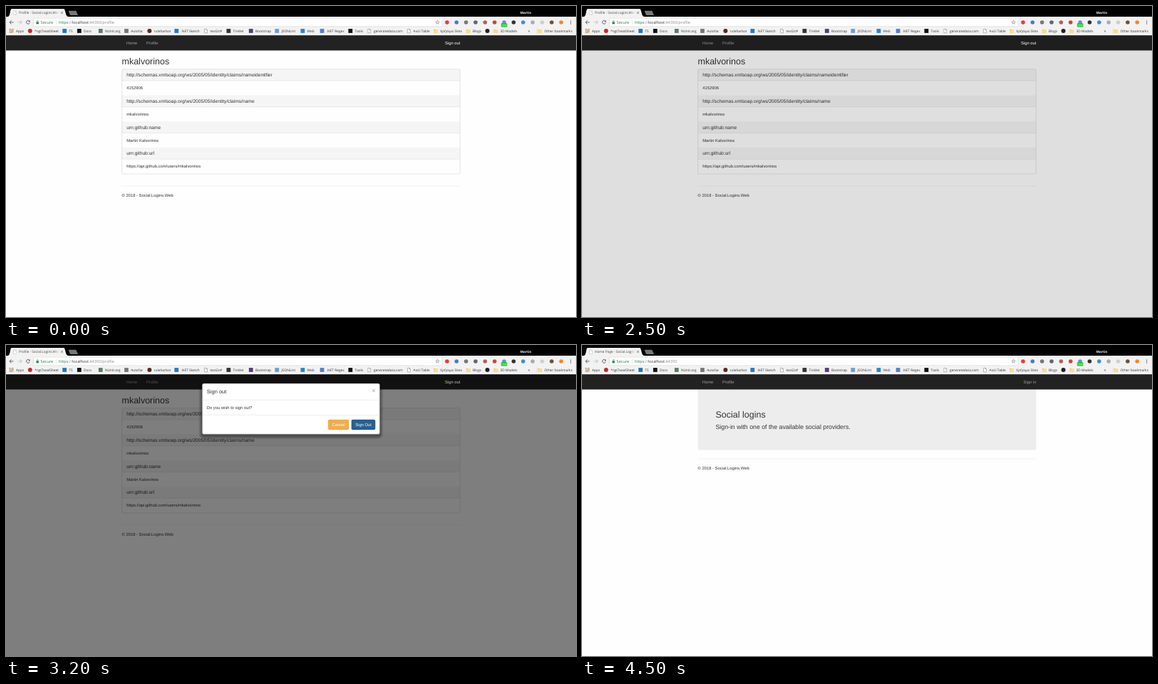
Animation, 800 px wide and 437 px high, one loop 6100 ms. Source, as an HTML page:

```html
<!DOCTYPE html>
<html lang="en">
<head>
<meta charset="utf-8">
<title>Sign out dialog</title>
<style>
  html, body { margin: 0; width: 100%; height: 100%; overflow: hidden; background: #000; }
  svg { display: block; width: 100vw; height: 100vh; }
  text { white-space: pre; text-rendering: geometricPrecision; }
  .page { font-family: "Liberation Sans", Arial, sans-serif; }
  .ui { font-family: "Open Sans", "Noto Sans", sans-serif; }
</style>
</head>
<body>
<svg id="stage" viewBox="0 0 800 437" preserveAspectRatio="none"></svg>
<script>
const NS = "http://www.w3.org/2000/svg";
const LOOP = 6100, STEP = 100;
const T = { backdrop: 2500, modal: 2700, hover: 3200, load: 3500, home: 4200, done: 4400 };
const USER = "mkalvorinos";

function el(parent, tag, attrs = {}) {
  const node = document.createElementNS(NS, tag);
  for (const key in attrs) node.setAttribute(key, attrs[key]);
  parent.appendChild(node);
  return node;
}
const group = (parent, attrs) => el(parent, "g", attrs);
const rect = (parent, x, y, width, height, fill, more) =>
  el(parent, "rect", { x, y, width, height, fill, ...more });
const dot = (parent, cx, cy, r, fill) => el(parent, "circle", { cx, cy, r, fill });
const path = (parent, d, more) => el(parent, "path", { d, fill: "none", ...more });
function text(parent, x, y, size, fill, str, more) {
  const node = el(parent, "text", { x, y, "font-size": size, fill, ...more });
  node.textContent = str;
  return node;
}
const line = (parent, x1, x2, y, stroke) =>
  path(parent, `M${x1} ${y}H${x2}`, { stroke, "stroke-width": 0.6 });
const show = (node, on) => node.setAttribute("display", on ? "inline" : "none");

const svg = document.getElementById("stage");
const page = group(svg, { class: "page" });
const ui = group(svg, { class: "ui" });

// ---- Web page ----
rect(page, 0, 41, 800, 396, "#fefefe");

function footer(parent, y) {
  line(parent, 162.5, 637.5, y, "#e8e8e8");
  text(parent, 162.5, y + 14.9, 5.83, "#333", "© 2018 - Social.Logins.Web");
}

function buildProfile() {
  const g = group(page);
  text(g, 162.5, 81.7, 12.5, "#333", USER);
  const claims = "http://schemas.xmlsoap.org/ws/2005/05/identity/claims/";
  const rows = [
    [claims + "nameidentifier", "4152906"],
    [claims + "name", USER],
    ["urn:github:name", "Martin Kalvorinos"],
    ["urn:github:url", "https://api.github.com/users/" + USER]
  ];
  rows.forEach(([head, body], i) => {
    const y = 88.8 + i * 36.7;
    rect(g, 162.8, y, 474.4, 16.2, "#f5f5f5", { rx: i ? 0 : 1.5 });
    line(g, 162.8, 637.2, y + 16.2, "#ddd");
    text(g, 169.2, y + 10.4, 6.67, "#333", head);
    text(g, 169.2, y + 28.5, 5.83, "#333", body);
  });
  rect(g, 162.7, 88.6, 474.6, 147.4, "none", { rx: 1.7, stroke: "#d4d4d4", "stroke-width": 0.6 });
  footer(g, 252.9);
  return g;
}

function buildHome() {
  const g = group(page);
  rect(g, 162.5, 62.3, 475, 85.2, "#eeedee", { rx: 2.5 });
  text(g, 187.5, 101.8, 12.5, "#333", "Social logins");
  text(g, 187.5, 117.7, 8.75, "#333", "Sign-in with one of the available social providers.");
  footer(g, 159.8);
  return g;
}

const profile = buildProfile();
const home = buildHome();

rect(page, 0, 41, 800, 21.5, "#222");
text(page, 168.8, 53.8, 5.83, "#9d9d9d", "Home");
text(page, 196.9, 53.8, 5.83, "#9d9d9d", "Profile");
const backdrop = rect(page, 0, 41, 800, 396, "#000");
const signLink = text(page, 637.4, 53.8, 5.83, "#fff", "", { "text-anchor": "end" });

function buildModal() {
  const g = group(page);
  // soft drop shadow from stacked translucent outlines
  for (let i = 6; i > 0; i--) {
    rect(g, 275.5 - i * 0.8, 56 - i * 0.8, 249 + i * 1.6, 71.5 + i * 1.6, "#000",
      { rx: 2.5 + i * 0.8, opacity: 0.075 });
  }
  rect(g, 275.3, 54, 249.4, 71.4, "#fff", { rx: 2.5, stroke: "#555", "stroke-width": 0.5 });
  text(g, 281.8, 68.1, 7.5, "#333", "Sign out");
  text(g, 516, 67, 8.75, "#bbb", "×", { "text-anchor": "middle", "font-weight": "bold" });
  line(g, 275.6, 524.4, 77.3, "#e2e2e2");
  text(g, 281.8, 90.1, 5.83, "#333", "Do you wish to sign out?");
  line(g, 275.6, 524.4, 98.4, "#e2e2e2");
  return g;
}

function button(parent, x, width, fill, stroke, label) {
  const box = rect(parent, x, 105.1, width, 13.8, fill, { rx: 1.7, stroke, "stroke-width": 0.5 });
  text(parent, x + width / 2, 114, 5.83, "#fff", label, { "text-anchor": "middle" });
  return box;
}

const modal = buildModal();
button(modal, 452.2, 28.8, "#f0ad4e", "#eea236", "Cancel");
const confirm = button(modal, 485, 33.1, "#337ab7", "#2e6da4", "Sign Out");

// ---- Browser frame ----
rect(ui, 0, 0, 800, 15.2, "#000");
rect(ui, 0, 15, 800, 26.2, "#f3f2f3");
path(ui, "M2 15.2C4.5 15 5 12.5 6 8C6.7 4.5 7 4 8.5 4H80.5C82 4 82.4 4.6 83.2 8C84.3 12.5 85 15 88 15.2Z", { fill: "#f3f2f3" });
path(ui, "M87.6 6.8H97.4Q98.4 6.8 98.9 8L101 13H91.3Q90.2 13 89.7 12Z", { fill: "#777" });
text(ui, 729.5, 10.9, 4.5, "#fff", "Martin", { "text-anchor": "middle", "font-weight": "bold" });

const fade = el(el(ui, "defs"), "linearGradient", { id: "fade" });
el(fade, "stop", { offset: 0, "stop-color": "#f3f2f3", "stop-opacity": 0 });
el(fade, "stop", { offset: 1, "stop-color": "#f3f2f3" });
const clip = el(el(ui, "clipPath", { id: "title" }), "rect", { x: 17, y: 4, width: 57.5, height: 11 });
const title = text(group(ui, { "clip-path": "url(#title)" }), 18, 11.2, 4.75, "#444", "");
rect(ui, 67.5, 5, 7.2, 9, "url(#fade)");
path(ui, "M77 8l3 3m0-3l-3 3", { stroke: "#555", "stroke-width": 0.7 });

const pageIcon = (parent, x, y, color = "#777") =>
  path(parent, `M${x - 1.9} ${y - 2.7}h2.5l1.5 1.5v4h-4zm2.5 0v1.5h1.5`, { fill: "#fff", stroke: color, "stroke-width": 0.5 });
const folder = (x, y) => {
  path(ui, `M${x - 3} ${y - 2.3}h2.3l.8 .8h2.9v4.2h-6z`, { fill: "#f2cd6b" });
  rect(ui, x - 3, y - 0.8, 6, 3.5, "#fadd8c");
};

const favicon = pageIcon(ui, 12.5, 9.5, "#bbb");
const spinner = path(ui, "M10.2 9.6A2.7 2.7 0 1 1 13.6 12.2", { stroke: "#4a86d8", "stroke-width": 0.9 });

const ink = { stroke: "#555", "stroke-width": 0.9 };
path(ui, "M10.5 22.9H5m2.6-2.6L5 22.9l2.6 2.6", ink);
path(ui, "M16.7 22.9h5.5m-2.6-2.6l2.6 2.6l-2.6 2.6", { ...ink, stroke: "#bbb" });
const reload = group(ui);
path(reload, "M32.9 21.4A2.4 2.4 0 1 0 33.2 23.7", ink);
path(reload, "M33.6 20v2.4h-2.4z", { fill: "#555" });
const stop = path(ui, "M28.6 20.7l4.5 4.5m0-4.5l-4.5 4.5", ink);

rect(ui, 38.7, 17.1, 573.3, 11.7, "#fff", { rx: 0.9, stroke: "#d0d0d0", "stroke-width": 0.5 });
rect(ui, 42.5, 22.5, 3.4, 2.8, "#188048");
path(ui, "M43.2 22.6v-1a1 1 0 0 1 2 0v1", { stroke: "#188048", "stroke-width": 0.6 });
text(ui, 48.6, 25, 5.6, "#188048", "Secure");
rect(ui, 70.7, 19.5, 0.5, 7, "#ccc");
const url = text(ui, 74, 25, 5.52, "#777", "");
const span = (fill, str) => { const s = el(url, "tspan", { fill }); s.textContent = str; return s; };
span("#188048", "https");
span("#888", "://");
span("#333", "localhost");
const urlTail = span("#888", "");

const star = Array.from({ length: 10 }, (_, i) => {
  const a = i * Math.PI / 5 - Math.PI / 2, r = i % 2 ? 1.2 : 2.8;
  return `${605.6 + r * Math.cos(a)},${23 + r * Math.sin(a)}`;
}).join(" ");
el(ui, "polygon", { points: star, fill: "none", stroke: "#666", "stroke-width": 0.5 });

["#d8433c", "#3f7fc4", "#777", "#5a6672", "#9b6c5a", "#c9473d", "#4d9bc9", "#333", "#3c92d0",
  "#aaa", "#d0d0d0", "#6b5238", "#ee8a2e"].forEach((c, i) => dot(ui, 619 + i * 13.35, 23, 2.8, c));
rect(ui, 694.8, 24.2, 8.6, 5.3, "#22c832", { rx: 0.8 });
text(ui, 699.1, 28.2, 3.6, "#fff", "new", { "text-anchor": "middle" });
for (let i = -1; i < 2; i++) dot(ui, 792.6, 23 + i * 2, 0.65, "#555");

const gridColors = ["#d9534f", "#e8a33d", "#5aa25a"];
for (let i = 0; i < 9; i++) {
  rect(ui, 4.7 + (i % 3) * 2.1, 32 + Math.floor(i / 3) * 2.1, 1.5, 1.5, gridColors[(i + Math.floor(i / 3)) % 3]);
}

// label, label x, icon: a colour for a square, o + colour for a circle
const bookmarks = [
  ["Apps", 14], ["*ngCheatSheet", 40, "o#c9282d"], ["TS", 88.4, "#2277b8"],
  ["Docs", 109, "#111"], ["NUnit.org", 139, "#5c7d64"], ["Autofac", 175.2, "#777"],
  ["ruleharbor", 207.6, "o#5b2a1c"], [".NET Sketch", 245.5, "#2b78c5"], ["text2c#", 286.6, "page"],
  ["Tinklet", 318.6, "#333"], ["Bootstrap", 350, "#563d7c"], ["JSONLint", 386.5, "#6aa0cf"],
  ["Web", 422.6, "#2688c9"], [".NET Regex", 449.8, "#527fd0"], ["Tools", 489.6, "#111"],
  ["generatedata.com", 516, "page"], ["Ascii Table", 571.6, "page"], ["Χρήσιμα Sites", 609.2, "folder"],
  ["Blogs", 655, "folder"], ["", 681.8, "o#222"], ["3D Models", 693.6, "folder"],
  ["Other bookmarks", 755.5, "folder"]
];
for (const [label, x, icon] of bookmarks) {
  const cx = x - 6.2;
  text(ui, x, 36.9, 4.8, "#333", label);
  if (icon === "page") pageIcon(ui, cx, 35);
  else if (icon === "folder") folder(cx, 35);
  else if (icon && icon[0] === "o") dot(ui, cx, 35, 3, icon.slice(1));
  else if (icon) rect(ui, cx - 2.9, 32.1, 5.8, 5.8, icon);
}
text(ui, 732.6, 37, 6, "#444", "»");
rect(ui, 744.3, 31.5, 0.4, 7, "#ccc");

// ---- Motion ----
const clamp = v => Math.min(1, Math.max(0, v));

function draw(now) {
  const t = Math.floor((now % LOOP) / STEP) * STEP;
  const atHome = t >= T.home;
  const loading = t >= T.load && t < T.done;
  const dialog = t >= T.modal && !atHome;

  show(profile, !atHome);
  show(home, atHome);

  const dim = t < T.backdrop || atHome ? 0 : Math.min(0.5, 0.12 + 0.27 * (t - T.backdrop) / 100);
  backdrop.setAttribute("opacity", dim);
  signLink.textContent = atHome ? "Sign in" : "Sign out";
  signLink.setAttribute("fill", atHome ? "#9d9d9d" : dim > 0.2 ? "#c4c4c4" : "#fff");

  show(modal, dialog);
  if (dialog) {
    const p = clamp((t - T.modal + 85) / 300);
    const lift = -17.8 * Math.pow(1 - p, 1.45);
    modal.setAttribute("transform", `translate(0 ${lift.toFixed(2)})`);
    modal.setAttribute("opacity", clamp(0.36 + (t - T.modal) / 150));
    const hover = t >= T.hover;
    confirm.setAttribute("fill", hover ? "#286090" : "#337ab7");
    confirm.setAttribute("stroke", hover ? "#204d74" : "#2e6da4");
  }

  title.textContent = atHome ? "Home Page - Social.Logins"
    : loading ? "https://localhost:44393" : "Profile - Social.Logins.Web";
  urlTail.textContent = t >= T.load ? ":44393" : ":44393/profile";
  show(favicon, !loading);
  show(spinner, loading);
  show(reload, !loading);
  show(stop, loading);
  spinner.setAttribute("transform", `rotate(${(t - T.load - 400) * 0.36} 12.9 9.6)`);
}

const start = performance.now();
function tick() {
  draw(performance.now() - start);
  requestAnimationFrame(tick);
}
tick();
</script>
</body>
</html>
```
